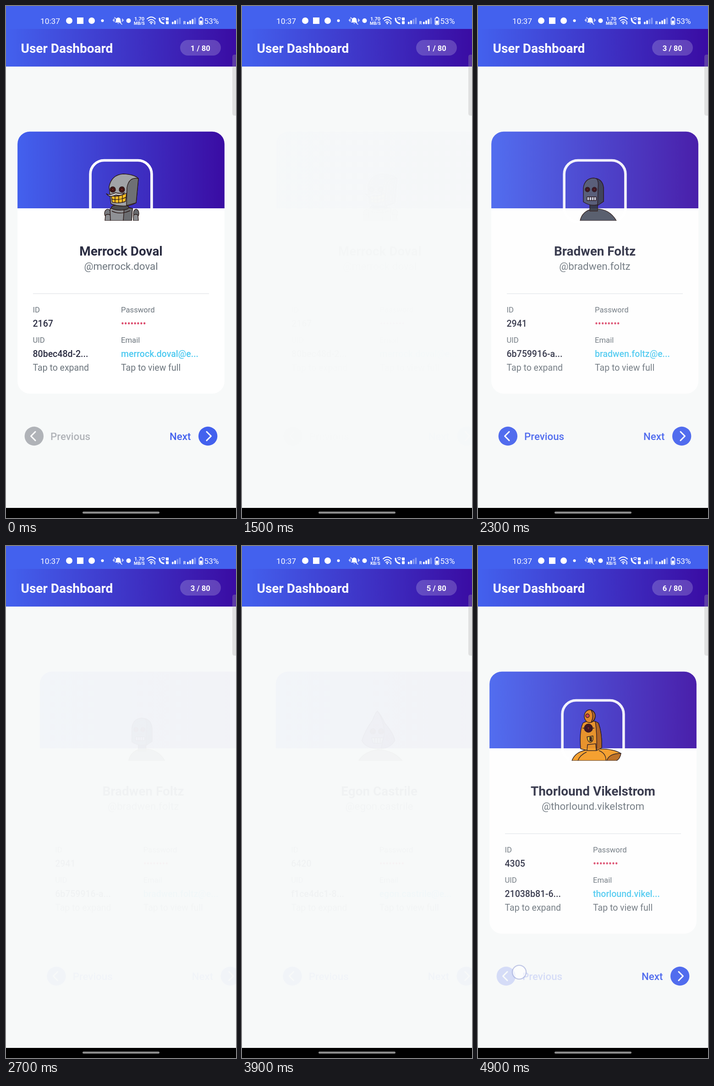
Animation of 502x1116 px, one loop 5 s. Source, as an HTML page:

```html
<!DOCTYPE html>
<html lang="en">
<head>
<meta charset="utf-8">
<title>User Dashboard</title>
<style>
html, body { margin: 0; width: 100%; height: 100%; overflow: hidden; background: #f7f9f9; }
svg { display: block; width: 502px; height: 1116px; }
text { font-family: Roboto, "Noto Sans", sans-serif; font-size: 19.5px; white-space: pre; }
.mid { text-anchor: middle; }
.med { font-weight: 500; }
.bold { font-weight: 700; }
.ink { fill: #2b2d42; }
.grey { fill: #6c757d; }
.label { font-size: 16.7px; }
.nav { font-size: 22.3px; font-weight: 500; }
.clock { font-size: 17.3px; }
.line { fill: none; stroke: #fff; stroke-linecap: round; stroke-linejoin: round; }
#bot { stroke: #2b1a18; stroke-width: 1.4; stroke-linejoin: round; }
/* each layer fades by itself, so layers below show through */
#page > * { opacity: var(--fade); }
</style>
</head>
<body>
<svg viewBox="0 0 502 1116">
  <defs>
    <linearGradient id="blue"><stop stop-color="#4361ee"/><stop offset="1" stop-color="#3a0ca3"/></linearGradient>
    <clipPath id="botClip"><rect x="187" y="340" width="128" height="128"/></clipPath>
  </defs>
  <rect width="502" height="1116" fill="#f7f9f9"/>

  <g id="page">
    <rect x="25.100" y="273.700" width="451.800" height="571.300" rx="27" fill="#fff"/>
    <path d="M25.100 441V300.700A27 27 0 0 1 52.100 273.700H449.900A27 27 0 0 1 476.900 300.700V441Z" fill="url(#blue)"/>
    <rect x="184.100" y="336.500" width="133.800" height="133.800" rx="30" fill="none" stroke="#fff" stroke-width="5.600"/>
    <g clip-path="url(#botClip)"><g id="bot"></g></g>
    <text id="name" class="mid bold ink" x="251" y="544" style="font-size:27.9px"></text>
    <text id="handle" class="mid grey" x="251" y="575" style="font-size:22.3px"></text>
    <path d="M59 627H443" stroke="#e6e8eb" stroke-width="1.5"/>
    <g class="grey">
      <text class="label" x="58.500" y="668">ID</text>
      <text class="label" x="251" y="668">Password</text>
      <text class="label" x="58.500" y="734">UID</text>
      <text class="label" x="251" y="734">Email</text>
      <text x="58.500" y="795">Tap to expand</text>
      <text x="251" y="795">Tap to view full</text>
    </g>
    <text id="userId" class="med ink" x="58.500" y="699"></text>
    <text class="med" x="251" y="699" fill="#dc4d6e">••••••••</text>
    <text id="uid" class="med ink" x="58.500" y="765"></text>
    <text id="email" class="med" x="251" y="765" fill="#4cc9f0"></text>
    <g><g id="prev">
      <circle cx="61.300" cy="937.500" r="20.700"/>
      <path class="line" d="M64 928L54.500 937.500L64 947" stroke-width="3"/>
      <text class="nav" x="97" y="946">Previous</text>
    </g></g>
    <g><g id="next" fill="#4361ee">
      <circle cx="440.700" cy="937.500" r="20.700"/>
      <path class="line" d="M438 928L447.500 937.500L438 947" stroke-width="3"/>
      <text class="nav" x="357" y="946">Next</text>
    </g></g>
  </g>

  <rect width="502" height="50.500" fill="#4361ee"/>
  <rect y="50" width="502" height="82" fill="url(#blue)"/>
  <text class="bold" x="32.500" y="102" fill="#fff" style="font-size:28px">User Dashboard</text>
  <rect x="380" y="74" width="89" height="34" rx="17" fill="#fff" fill-opacity=".2"/>
  <text id="count" class="mid bold label" x="424.300" y="98" fill="#fff"></text>

  <g fill="#fff">
    <text class="clock" x="75" y="38.500">10:37</text>
    <circle cx="138" cy="32" r="7"/>
    <rect x="155" y="25" width="14" height="14"/>
    <circle cx="187" cy="32" r="7"/>
    <circle cx="210.500" cy="32" r="3"/>
    <path d="M238 36Q240 34 240 30Q240 26 245 25Q250 26 250 30Q250 34 252 36ZM243 37.500H247Q245 40 243 37.500Z"/>
    <path class="line" d="M237 25L253 40M236 28V34M254 28V34M234 30V32M256 30V32" stroke-width="1.400"/>
    <circle cx="267.500" cy="32" r="5"/>
    <text id="rate" class="mid bold" x="291" y="32" style="font-size:11px"></text>
    <text id="unit" class="mid bold" x="291" y="40.500" style="font-size:9.500px"></text>
    <path class="line" d="M308 28Q317 20 326 28M311 32Q317 27 323 32M314 35.500Q317 33 320 35.500" stroke-width="2"/>
    <circle cx="317" cy="38" r="1.700"/>
    <path d="M322 36L324.500 33L327 36ZM322 37.500L324.500 40.500L327 37.500Z"/>
    <path class="line" d="M335 27Q335 36 344 38" stroke-width="3.200"/>
    <path class="line" d="M339 27Q343 23 347 27M341 30Q343 28 345 30" stroke-width="1.500"/>
    <rect x="349" y="25" width="6" height="6.500" rx="1"/><rect x="349" y="33" width="6" height="6.500" rx="1"/>
    <g id="bars"></g>
    <text class="bold" x="387" y="40" style="font-size:8.500px">R</text>
    <rect class="line" x="421.500" y="26" width="8" height="14.500" rx="2" stroke-width="1.500"/>
    <rect x="423.500" y="23.500" width="4" height="2"/><rect x="423" y="32" width="5" height="7"/>
    <text class="clock" x="432.500" y="38.500">53%</text>
  </g>

  <path d="M502 106H499Q494 106 494 111V234Q494 239 499 239H502Z" fill="#aaa" fill-opacity=".3"/>
  <g id="touch">
    <circle r="15" fill="#fff" fill-opacity=".6" stroke="#98a2d8" stroke-opacity=".55" stroke-width="2.500"/>
    <circle r="13" fill="none" stroke="#fff" stroke-opacity=".6" stroke-width="1.500"/>
  </g>
  <rect y="1094" width="502" height="22" fill="#000"/>
  <rect x="167" y="1102" width="168" height="4.500" rx="2.200" fill="#8c8c8c"/>
</svg>

<script>
const $ = id => document.getElementById(id);
const shape = (d, fill) => `<path d="${d}" fill="${fill}"/>`;
const oval = (x, y, rx, ry, fill) => `<ellipse cx="${x}" cy="${y}" rx="${rx}" ry="${ry}" fill="${fill}"/>`;
const stroke = d => shape(d, "none");
const eyes = (y, r, ...xs) => xs.map(x => oval(x, y, r, r, "#451315") + oval(x, y, r / 3, r / 3, "#b02622")).join("");

const bots = [
  // grey, square-headed
  oval(222, 452, 7, 9, "#77797d") + oval(284, 452, 6, 9, "#66686c") +
  shape("M216 468L217 456Q222 452 228 456V468ZM278 468V456Q284 452 288 456L289 468Z", "#8c8e92") +
  shape("M227 442Q250 434 276 441L274 468H228Z", "#8f9195") +
  shape("M258 439L276 441L274 468H256Z", "#6b6d71") +
  oval(249, 439, 19, 6, "#4b4c50") + stroke("M231 447Q250 456 271 446") +
  shape("M229 431L225 394Q230 368 256 366Q280 367 289 376L284 429Q272 436 257 436Q241 436 229 431Z", "#a1a3a7") +
  shape("M264 396Q268 372 289 376L284 429L263 435Z", "#6e7074") + eyes(400, 6, 233, 253) +
  shape("M230 414Q247 417 263 408L261 426Q247 431 232 428Z", "#f6bd24") +
  stroke("M231 421Q247 424 262 417M238 415V429M246 415V430M254 413V429") +
  shape("M219 409Q224 414 239 407Q252 410 259 407Q252 415 240 412Q226 419 219 409Z", "#c9cbce"),
  // yellow, round-headed
  shape("M251 431H259L260 458H252Z", "#66666a") + stroke("M251 438H259M251 444H259M252 450H260") +
  shape("M244 468L246 456Q255 450 266 455L270 468Z", "#efdc36") +
  shape("M263 468L266 450Q277 446 278 458L276 468Z", "#b39e2e") + oval(243, 457, 5, 6, "#c7b333") +
  oval(270, 455, 7, 7, "#b39e2e") +
  shape("M221 405Q222 376 250 375Q274 378 276 405Q274 430 250 434Q223 432 221 405Z", "#f1df37") +
  shape("M264 402Q262 384 256 376Q274 381 276 405Q274 430 251 434Q263 424 264 402Z", "#ae982b") +
  shape("M221 400Q222 390 240 391Q260 391 260 398Q258 405 240 405Q224 406 221 400Z", "#d8c535") +
  oval(240, 398, 16, 5, "#3d1a12") + oval(235, 398, 2, 2, "#a64a2c") + oval(246, 398, 2, 2, "#a64a2c") +
  shape("M220 409Q230 412 240 407Q252 411 263 408Q255 415 241 412Q228 417 220 409Z", "#efdc36") +
  shape("M238 417H241V428H239ZM243 417H246V429H243ZM248 417H250V429H248ZM252 416H254V427H252Z", "#3d1a12"),
  // slate
  shape("M219 468Q223 447 247 442Q282 440 298 468Z", "#4d5363") + shape("M240 432H257V447H240Z", "#333743") +
  shape("M226 427V396Q229 376 248 375Q268 377 270 396V426Q250 442 226 427Z", "#5c6274") +
  shape("M258 398Q260 380 254 376Q268 379 270 396V426L257 435Z", "#3f4453") +
  eyes(400, 5, 235, 250) + shape("M234 416H254V424H234Z", "#d9dce2") + stroke("M239 416V424M244 416V424M249 416V424"),
  // teal, pick-shaped
  shape("M250 434H259L261 456H251Z", "#8d6c70") + stroke("M250 441H259M251 448H260") +
  shape("M245 468L247 456Q256 450 266 456L270 468Z", "#3aba53") + oval(270, 457, 7, 8, "#3d7c4b") + oval(243, 459, 5, 6, "#339d49") +
  shape("M214 382Q247 363 284 382Q286 405 270 428Q257 445 243 437Q214 417 214 382Z", "#2fa394") +
  shape("M268 390L284 382Q286 405 270 428Q261 441 252 440Q266 420 268 390Z", "#33665f") +
  oval(238, 398, 19, 6, "#9a7686") + eyes(398, 4, 231, 245) +
  shape("M219 410Q240 404 262 408Q250 414 220 412Z", "#5ecdb9") + oval(246, 422, 9, 5, "#6a2337"),
  // plum, cone-headed
  shape("M206 468Q218 448 248 444Q282 445 301 468Z", "#6f5876") +
  shape("M213 424Q220 402 236 380Q243 362 247 360Q256 370 263 386Q282 408 285 424Q276 440 248 442Q220 440 213 424Z", "#89668b") +
  shape("M262 410Q262 382 247 360Q256 370 263 386Q282 408 285 424Q276 440 255 442Z", "#60466b") +
  eyes(404, 6, 237, 255) + shape("M234 418H260L256 430H238Z", "#d3c8ad") + stroke("M241 418V430M247 418V430M253 418V430"),
  // orange, with antenna
  shape("M205 468Q212 448 240 444Q288 438 312 452Q310 464 302 468Z", "#f59a20") +
  shape("M281 468Q286 452 312 452Q310 464 302 468Z", "#b96817") + stroke("M218 468Q222 456 237 449M264 446Q280 452 279 468") +
  shape("M224 442Q221 402 229 386Q246 376 263 386Q271 408 270 440Q248 450 224 442Z", "#f59a20") +
  shape("M256 382L263 386Q271 408 270 440L259 446Q260 408 256 382Z", "#b96817") +
  oval(244, 371, 12, 14, "#ef8e1d") + shape("M247 358Q257 362 256 372Q254 382 247 384Q254 371 247 358Z", "#b96817") +
  oval(239, 370, 4, 4, "#d74448") + eyes(397, 9, 241) + stroke("M228 397H254") +
  shape("M238 416L251 414V422Q249 428 245 428Q239 427 238 416Z", "#f6c82b") + shape("M244 417H248V425H244Z", "#51260f") +
  shape("M239 433L257 431L258 446H238Z", "#f59a20")
];

const users = [
  ["Merrock Doval", "2167", "80bec48d-2..."],
  ["Filina Astel", "2747", "adf01ecd-e..."],
  ["Bradwen Foltz", "2941", "6b759916-a..."],
  ["Enzo Mardek", "4198", "be7873e4-9..."],
  ["Egon Castrile", "6420", "f1ce4dc1-8..."],
  ["Thorlound Vikelstrom", "4305", "21038b81-6..."]
];

// Release time and touch point of each tap
const taps = [
  [1280, 444, 945], [1860, 436, 938], [2465, 438, 942],
  [3055, 435, 948], [3665, 438, 942], [4860, 90, 929]
];
const LOOP = 5000, STEP = 100, LEAD = 110, OUT = 200, IN = 300, SWAP = 240;

const clamp = x => Math.min(1, Math.max(0, x));
const ease = x => (x = clamp(x), x < .5 ? 2 * x * x : 1 - 2 * (1 - x) ** 2);

$("bars").innerHTML = [362, 395].map((x, row) => [5, 8, 11, 14].map((h, i) =>
  `<rect x="${x + i * 5.2}" y="${39.5 - h}" width="3.7" height="${h}" rx="1" opacity="${i > 1 + row ? .35 : 1}"/>`
).join("")).join("");

let shown = -1;
function showUser(i) {
  if (i === shown) return;
  shown = i;
  const [name, userId, uid] = users[i];
  const login = name.toLowerCase().replace(" ", ".");
  const email = (login + "@email").slice(0, 15) + "...";
  const values = { name, handle: "@" + login, userId, uid, email, count: `${i + 1} / 80` };
  for (const key in values) $(key).textContent = values[key];
  $("bot").innerHTML = bots[i];
  $("prev").setAttribute("fill", i ? "#4361ee" : "#b0b3b8");
}

function draw(now) {
  const t = Math.floor(now % LOOP / STEP) * STEP;
  const k = taps.findLastIndex(([at]) => t >= at - LEAD);
  const [at, x, y] = taps[Math.max(k, 0)];
  const e = k < 0 ? -LEAD : t - at;
  const enter = ease((e - OUT) / IN);
  const dim = k < 0 ? 1 : .2 + .8 * ease((e - 40) / 200);

  showUser(Math.max(k, 0) + (e >= SWAP ? 1 : 0));
  $("page").style.setProperty("--fade", e < OUT ? 1 - ease(e / OUT) : enter);
  $("page").setAttribute("transform", `translate(${e < OUT ? 0 : 50 * (1 - enter)})`);
  $("next").setAttribute("opacity", x > 251 ? dim : 1);
  $("prev").setAttribute("opacity", x > 251 ? 1 : dim);
  $("touch").setAttribute("transform", `translate(${x} ${y})`);
  $("touch").setAttribute("opacity", k < 0 ? 0 : clamp((OUT - e) / 100));
  $("rate").textContent = t < 3000 ? "1.70" : "175";
  $("unit").textContent = t < 3000 ? "MB/S" : "KB/S";
}

const start = performance.now();
(function frame() {
  draw(performance.now() - start);
  requestAnimationFrame(frame);
})();
</script>
</body>
</html>
```
